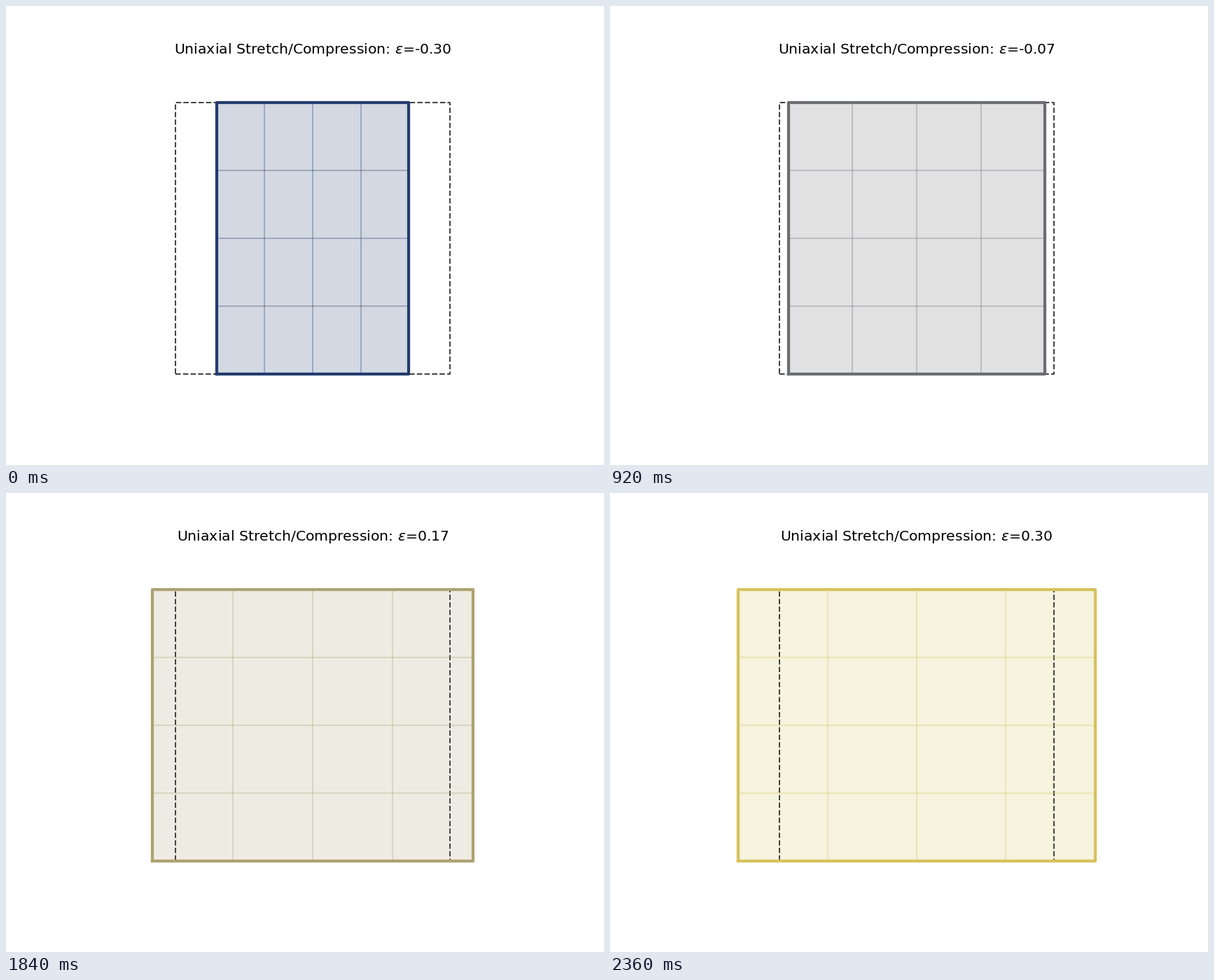
A matplotlib script for the animation above (2.4 s loop, 854 px wide and 656 px high).

```python
import numpy as np
import matplotlib.pyplot as plt
from matplotlib.animation import FuncAnimation

WIDTH, HEIGHT, DPI = 854, 656, 122
FRAMES = 60
MAX_STRAIN = 0.3
CELLS = 4

plt.rcParams["font.family"] = "DejaVu Sans"
plt.rcParams["mathtext.fontset"] = "dejavusans"

# 7 x 5.37705 in at 122 dpi is 854 x 656 px
fig = plt.figure(figsize=(7, 5.37705), dpi=DPI, facecolor="white")
ax = fig.add_axes((106.6 / WIDTH, 71.8 / HEIGHT, 662.8 / WIDTH, 504.4 / HEIGHT))
half_view = 0.5 * (1 + MAX_STRAIN) * 1.3
ax.set_xlim(-half_view, half_view)
ax.set_ylim(-0.65, 0.65)
ax.axis("off")

cmap = plt.get_cmap("cividis")
strains = np.linspace(-MAX_STRAIN, MAX_STRAIN, FRAMES)
square = np.array([(-1, -1), (1, -1), (1, 1), (-1, 1), (-1, -1)]) / 2
ends = np.array([-0.5, 0.5])
ticks = np.linspace(-0.5, 0.5, CELLS + 1)[1:-1]


def grid_lines():
    return [ax.plot([], [], lw=1.2, alpha=0.3, zorder=3)[0] for _ in ticks]


body, = ax.fill(*square.T, lw=0, alpha=0.2, zorder=1)
ax.plot(*square.T, "--", color="#444444", lw=1.2, zorder=2)
columns, rows = grid_lines(), grid_lines()
outline, = ax.plot([], [], lw=2.5, zorder=4)
title = ax.set_title("", fontsize=12, pad=7)


def update(i):
    strain = strains[i]
    stretch = 1 + strain
    color = cmap(0.15 + 0.7 * i / (FRAMES - 1))

    shape = square * (stretch, 1)
    body.set_xy(shape)
    body.set_facecolor(color)
    outline.set_data(*shape.T)

    for t, column, row in zip(ticks, columns, rows):
        column.set_data([t * stretch] * 2, ends)
        row.set_data(ends * stretch, [t, t])
    for line in (outline, *columns, *rows):
        line.set_color(color)

    title.set_text(rf"Uniaxial Stretch/Compression: $\varepsilon$={strain:.2f}")
    return body, outline, title, *columns, *rows


anim = FuncAnimation(fig, update, frames=FRAMES, interval=40,
                     repeat=True, repeat_delay=0, blit=False)
plt.show()
```
